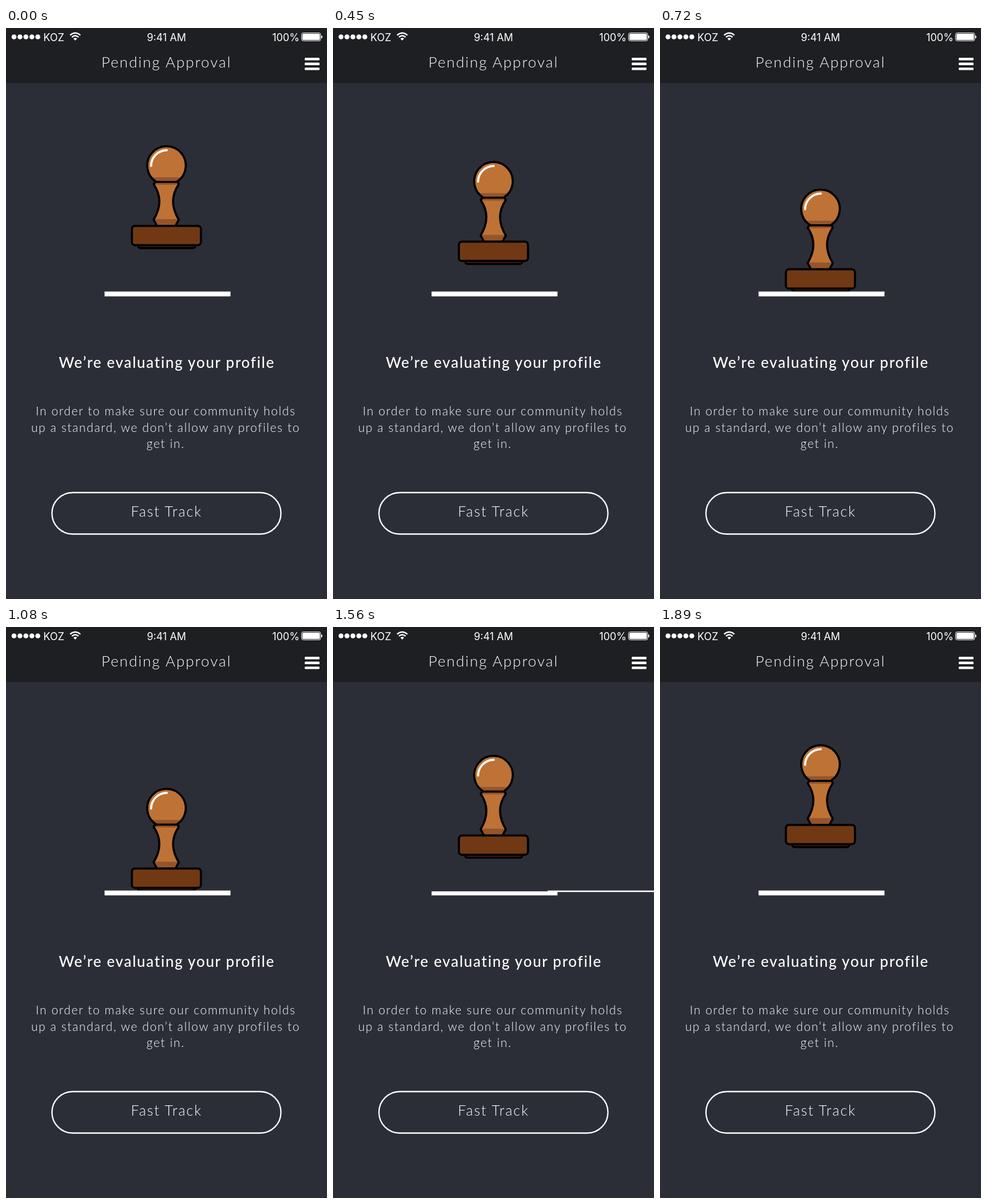
An HTML page for the animation above (1920 ms loop, 561x998 px).

```html
<!DOCTYPE html>
<html lang="en">
<head>
<meta charset="utf-8">
<title>Pending Approval</title>
<style>
  html, body { margin: 0; width: 100%; height: 100%; overflow: hidden; background: #2c2e37; }
  svg { display: block; width: 100vw; height: 100vh; }
  text { fill: #fff; font-family: Lato, "Open Sans", sans-serif; font-weight: 300; text-anchor: middle; }
  .status { font-family: Inter, Roboto, sans-serif; font-size: 18px; font-weight: 400; }
  .title { font-size: 26px; letter-spacing: 2px; }
  .heading { font-size: 26px; font-weight: 500; letter-spacing: 1.7px; }
  .body { font-size: 21px; letter-spacing: 1.62px; }
  .button { font-size: 25px; letter-spacing: 1.9px; }
</style>
</head>
<body>
<svg viewBox="0 0 561 998">
  <defs>
    <clipPath id="ball"><circle cx="280.5" cy="240.3" r="33.7"/></clipPath>
    <clipPath id="neck"><use href="#neckShape"/></clipPath>
    <path id="neckShape" d="M261 269H300L302 273Q282 302 302 335L296 346H264L258 335Q278 302 258 273Z"/>
  </defs>
  <rect width="561" height="998" fill="#2c2e37"/>
  <rect width="561" height="96" fill="#1e1f23"/>

  <g fill="#fff">
    <circle cx="14" cy="15.5" r="4.3"/>
    <circle cx="24.4" cy="15.5" r="4.3"/>
    <circle cx="34.8" cy="15.5" r="4.3"/>
    <circle cx="45.2" cy="15.5" r="4.3"/>
    <circle cx="55.6" cy="15.5" r="4.3"/>
    <path d="M121 22L117.8 18.6Q121 16 124.2 18.6Z"/>
    <path d="M115.2 16Q121 11 126.8 16M112 12.6Q121 5 130 12.6" fill="none" stroke="#fff" stroke-width="2.4"/>
    <rect x="516.5" y="8.5" width="33.5" height="14" rx="3" fill="none" stroke="#fff"/>
    <rect x="518" y="10" width="30.5" height="11" rx="1.5"/>
    <path d="M551 13Q553 13 553 15.5T551 18Z"/>
    <rect x="522" y="52" width="26" height="4.4" rx="1.5"/>
    <rect x="522" y="60.6" width="26" height="4.4" rx="1.5"/>
    <rect x="522" y="69.2" width="26" height="4.4" rx="1.5"/>
  </g>
  <text class="status" x="83.5" y="23">KOZ</text>
  <text class="status" x="280.5" y="23">9:41 AM</text>
  <text class="status" x="489" y="23">100%</text>
  <text class="title" x="280.5" y="69">Pending Approval</text>

  <g id="stamp" stroke="#000" stroke-width="3.7" stroke-linejoin="round">
    <rect x="231" y="374" width="99.7" height="10.7" rx="4" fill="#4c200b"/>
    <g clip-path="url(#ball)" stroke="none">
      <rect x="245" y="205" width="72" height="64" fill="#be7236"/>
      <rect x="245" y="261" width="72" height="9" fill="#95552b"/>
    </g>
    <path d="M262.5 268.8A33.7 33.7 0 1 1 298.5 268.8" fill="none"/>
    <path d="M253.6 241A27.5 27.5 0 0 1 281 213.6" fill="none" stroke="#fff" stroke-linecap="round"/>
    <g clip-path="url(#neck)" stroke="none">
      <rect x="255" y="268" width="50" height="80" fill="#be7236"/>
      <rect x="255" y="268" width="50" height="6" fill="#95552b"/>
      <rect x="255" y="334" width="50" height="12" fill="#95552b"/>
    </g>
    <use href="#neckShape" fill="none"/>
    <rect x="220" y="345.8" width="120.7" height="33.8" rx="5.5" fill="#703913"/>
  </g>

  <path id="impact" fill="none" stroke="#fff" stroke-width="2" stroke-linecap="round"/>
  <rect x="172.3" y="462" width="220" height="7.1" fill="#fff"/>
  <rect id="oldSheet" x="172.3" y="460.6" width="220" height="2.6" fill="#fff"/>
  <rect id="newSheet" x="172.3" y="460.6" width="220" height="2.6" fill="#fff"/>

  <text class="heading" x="281" y="594">We’re evaluating your profile</text>
  <text class="body" x="279.3" y="677">In order to make sure our community holds</text>
  <text class="body" x="279" y="705.5">up a standard, we don’t allow any profiles to</text>
  <text class="body" x="279" y="734">get in.</text>
  <rect x="80.3" y="812" width="400.2" height="72.5" rx="36.25" fill="none" stroke="#fff" stroke-width="2.3"/>
  <text class="button" x="280.5" y="854">Fast Track</text>
</svg>
<script>
  const LOOP = 1920, STEP = 30, DROP = 76.3;
  const get = id => document.getElementById(id);
  const [stamp, impact, oldSheet, newSheet] = ['stamp', 'impact', 'oldSheet', 'newSheet'].map(get);
  const progress = (t, from, to) => Math.min(1, Math.max(0, (t - from) / (to - from)));
  const shift = (el, x, y) => el.setAttribute('transform', `translate(${x} ${y})`);

  function stampOffset(t) {
    if (t < 1080) return DROP * progress(t, 0, 722) ** 2.15;
    // Brisk lift that settles gently at the top.
    const x = progress(t, 1080, 1830);
    return DROP * (1 - (0.63 * x * (1 - x) ** 2 + x * x * (3 - 2 * x)));
  }

  function impactPath(p) {
    if (p <= 0 || p >= 1) return '';
    const far = 70 + 49 * Math.sqrt(p), near = far - 14 * (1 - p);
    return [-1, 1].map(side =>
      `M${283 + side * near} 457L${283 + side * far} 454`).join('');
  }

  function draw(t) {
    shift(stamp, 0, stampOffset(t));
    impact.setAttribute('d', impactPath(progress(t, 720, 900)));
    shift(oldSheet, 203 * (Math.max(0, t - 1380) / 180) ** 2, 0);
    shift(newSheet, -393 * (1 - progress(t, 1590, 1860)) ** 2, 0);
  }

  const start = performance.now();
  function tick(now) {
    const t = Math.max(0, now - start) % LOOP;
    draw(Math.floor(t / STEP) * STEP);
    requestAnimationFrame(tick);
  }
  draw(0);
  requestAnimationFrame(tick);
</script>
</body>
</html>
```
